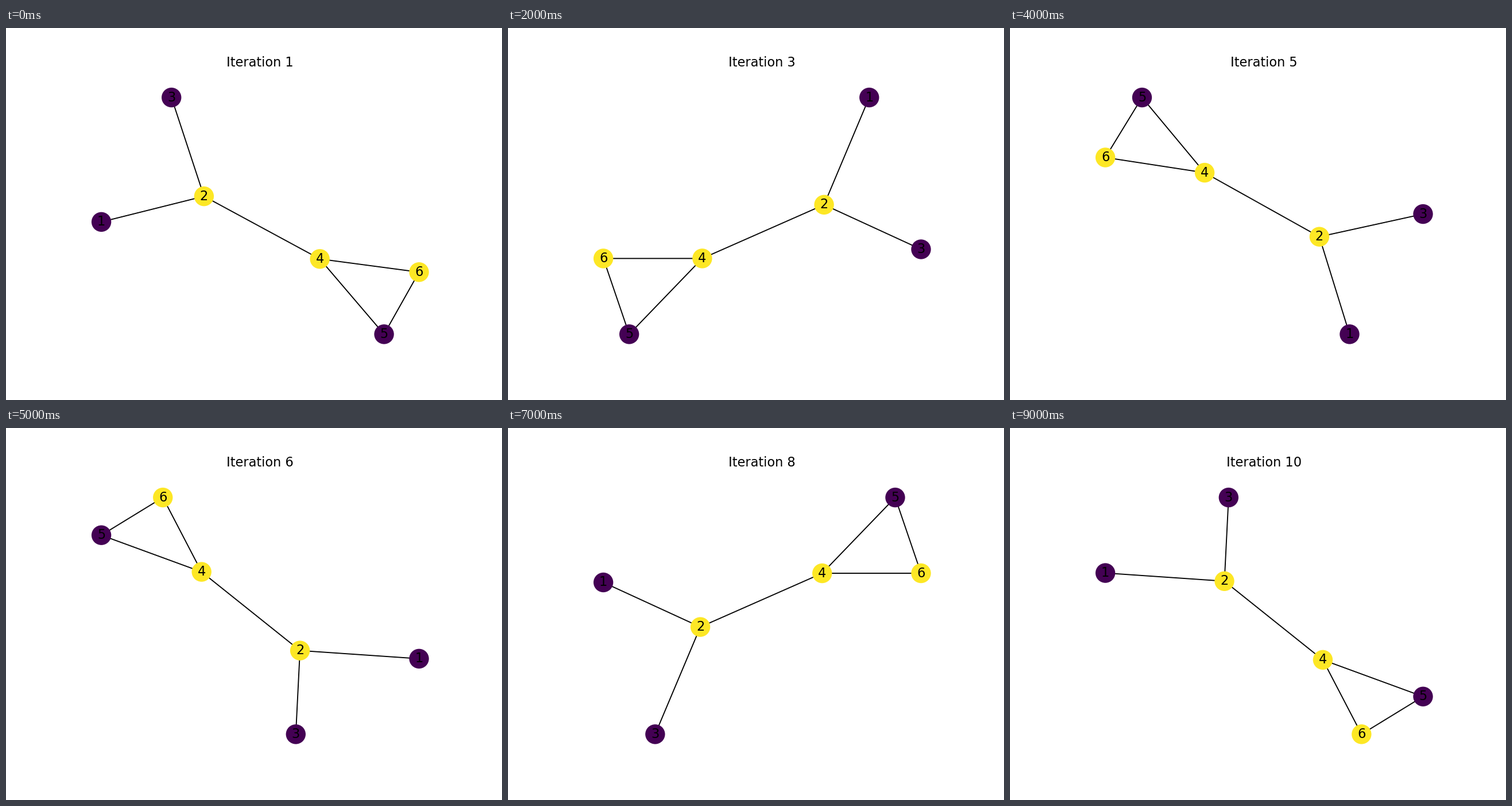
These frames come from a looping animation (864x648 px, 10000 ms). A matplotlib script:

```python
import numpy as np
import matplotlib.pyplot as plt
from matplotlib.animation import FuncAnimation

EDGES = np.array([(1, 2), (2, 3), (2, 4), (4, 5), (4, 6), (5, 6)]) - 1
DARK, LIGHT = "#440154", "#fde725"
COLORS = [DARK, LIGHT] * 3

# Per step: clockwise angle of the 2-4 axis in degrees, sides of nodes 1 and 5
POSES = [
    (28.9, 1, 1), (-106.4, -1, -1), (158.8, 1, -1), (38.5, -1, 1),
    (-149.7, -1, 1), (-131.2, 1, -1), (-123.1, -1, 1), (-21.2, -1, -1),
    (106.4, 1, 1), (48.8, 1, -1),
]


def spring_layout(rounds=2000, rate=0.04):
    """Let linked nodes attract and all nodes repel until they settle."""
    pos = np.array([(-2, 1), (-1, 0), (-2, -1), (1, 0), (2, 0.5), (2, -0.5)])
    link = np.zeros((6, 6))
    for a, b in EDGES:
        link[a, b] = link[b, a] = 1
    for _ in range(rounds):
        delta = pos[:, None] - pos
        dist = np.hypot(*delta.T) + np.eye(6)
        pull = 1 / dist**2 - link * dist
        pos = pos + rate * (delta * pull[..., None]).sum(axis=1)
    return pos


SHAPE = spring_layout()


def pose(angle, side1, side5):
    x, y = SHAPE.T
    y = y * np.repeat([side1, side5], 3)
    t = np.radians(angle)
    c, s = np.cos(t), np.sin(t)
    return np.column_stack([c * x - s * y, -s * x - c * y])


fig, ax = plt.subplots(figsize=(6.4, 4.8), dpi=135)


def draw(i):
    pos = pose(*POSES[i])
    ax.clear()
    ax.axis("off")
    ax.margins(0.105)
    for edge in EDGES:
        ax.plot(*pos[edge].T, color="k", lw=1, zorder=1)
    ax.scatter(*pos.T, s=300, c=COLORS, linewidths=1, zorder=2)
    for n, (x, y) in enumerate(pos, 1):
        ax.text(x, y, str(n), size=12, ha="center", va="center", zorder=3)
    ax.set_title(f"Iteration {i + 1}", size=12)


anim = FuncAnimation(fig, draw, frames=len(POSES), interval=1000, repeat=True)
plt.show()
```
